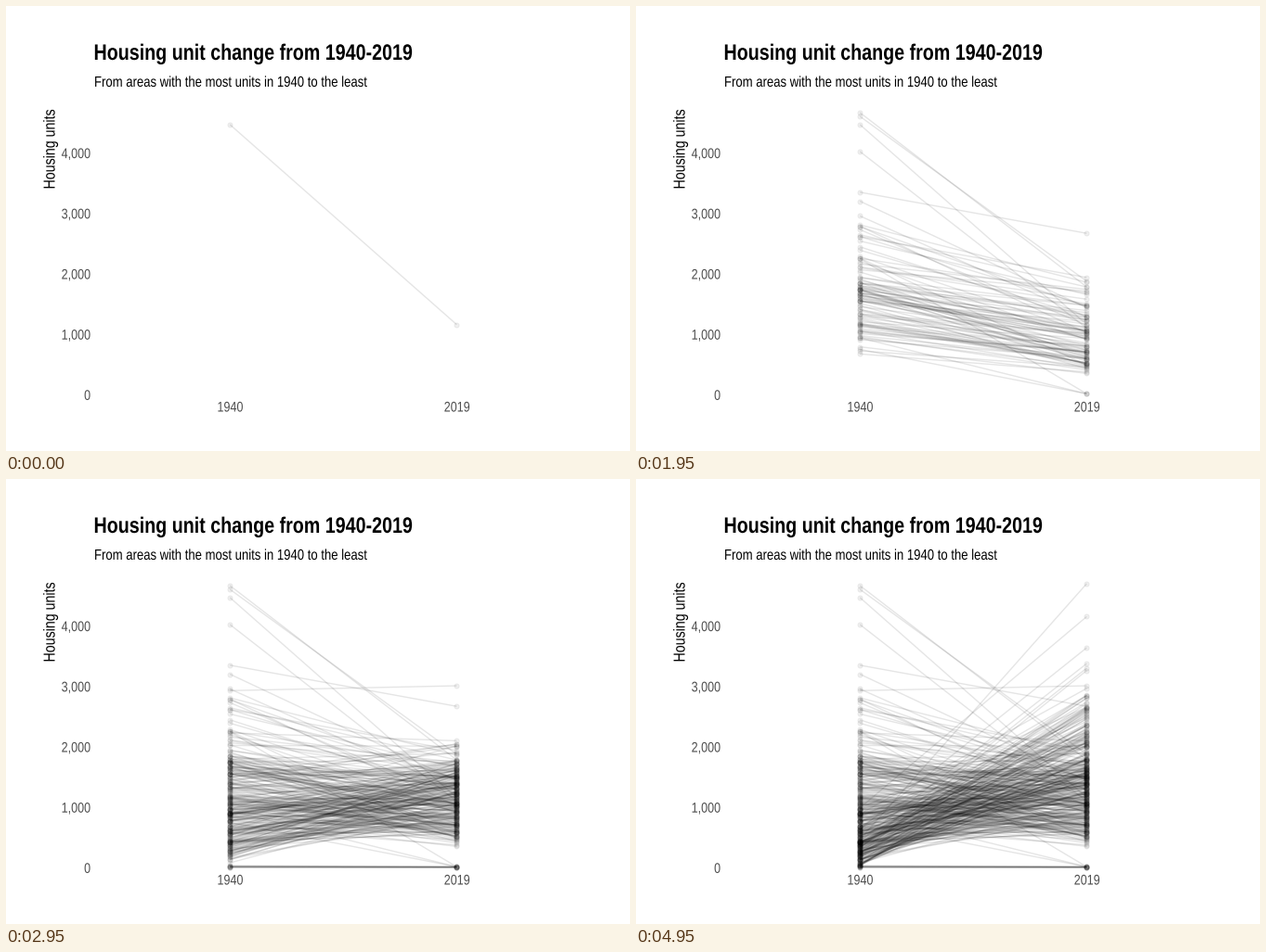
Write a matplotlib script that moves like this. It is 672 by 480 pixels and loops after 5000 ms.

```python
import matplotlib.pyplot as plt
import numpy as np
from matplotlib.animation import FuncAnimation
from matplotlib.collections import LineCollection
from matplotlib.patches import PathPatch
from matplotlib.textpath import TextPath
from matplotlib.transforms import Affine2D

W, H, DPI = 672, 480, 96
FRAMES, INTERVAL = 100, 50
X0, X1 = 241.2, 485.4          # columns of the two years
Y_ZERO, UNIT = 419.3, 0.0652   # pixel of zero, pixels per housing unit
PX = 72 / DPI                  # points per pixel
GREY = "#4d4d4d"
NARROW = 0.82                  # proportion of a narrow sans face

# Lines that stand apart from the crowd: (units in 1940, units in 2019)
LANDMARKS = [
    (4469, 1160), (4023, 1100), (4667, 1783), (4605, 1876), (2250, 15),
    (3202, 1439), (2788, 1024), (2259, 488), (940, 15), (750, 15),
    (3350, 2670), (2930, 3010), (640, 3640), (990, 4155), (470, 4700),
]
# The crowd: (lines, smallest change, largest change)
SPANS = [
    (2, -1700, -1570), (29, -1330, -725), (103, -725, 110), (75, 110, 645),
    (112, 645, 1860), (38, 1860, 2560), (3, 2930, 3060),
]
# Lowest and highest 1940 value possible for a given change
CHANGE = [-1650, -1330, -725, -300, 110, 645, 1000, 1860, 2560, 3060]
LOWEST = [2950, 1670, 1060, 650, 400, 130, 60, 30, 30, 240]
HIGHEST = [3060, 2980, 2750, 2400, 2150, 1750, 1500, 1150, 780, 450]

rng = np.random.default_rng(1940)


def spread(n, low, high):
    """Evenly stratified random values, so every short span holds some."""
    return low + (high - low) * (np.arange(n) + rng.random(n)) / n


def make_data():
    change = np.concatenate([spread(*span) for span in SPANS])
    low = np.interp(change, CHANGE, LOWEST)
    high = np.interp(change, CHANGE, HIGHEST)
    # Growing areas lean towards small beginnings
    lean = np.interp(change, [-700, 1000], [1.6, 3.2])
    start = low + (high - low) * rng.beta(1.2, lean)
    empty = rng.uniform(5, 35, 9)
    return np.vstack([
        LANDMARKS,
        np.column_stack([start, start + change]),
        np.column_stack([empty, empty * 0.6]),
    ])


data = make_data()
change = data[:, 1] - data[:, 0]
step = np.ptp(change) / (FRAMES - 1)
reveal = np.floor((change - change.min()) / step + 1e-6)
order = np.argsort(reveal, kind="stable")
reveal = reveal[order]
heights = Y_ZERO - UNIT * data[order]
segments = np.stack(
    [np.column_stack([np.full(len(heights), x), heights[:, i]])
     for i, x in enumerate((X0, X1))], axis=1)

fig = plt.figure(figsize=(W / DPI, H / DPI), dpi=DPI, facecolor="white")
ax = fig.add_axes([0, 0, 1, 1])
ax.set_xlim(0, W)
ax.set_ylim(H, 0)
ax.axis("off")


def label(x, y, text, size, color="black", weight="normal", align=0, angle=0):
    """Text with its baseline at y; align 0 is left, 0.5 centre, 1 right."""
    font = {"family": "Liberation Sans", "weight": weight}
    path = TextPath((0, 0), text, size=size, prop=font)
    shift = -align * path.get_extents().x1
    place = (Affine2D().translate(shift, 0).scale(NARROW, -1)
             .rotate_deg(-angle).translate(x, y))
    ax.add_patch(PathPatch(place.transform_path(path), fc=color, lw=0))


label(94.5, 58, "Housing unit change from 1940-2019", 24, weight="bold")
label(95, 87, "From areas with the most units in 1940 to the least", 16)
label(52.5, 197.5, "Housing units", 17.33, angle=90)
for value in range(0, 5000, 1000):
    label(90.6, Y_ZERO - UNIT * value + 5.6, f"{value:,}", 15.33, GREY, align=1)
for x, year in ((X0, "1940"), (X1, "2019")):
    label(x, 437.5, year, 15.33, GREY, align=0.5)

lines = LineCollection([], colors=[(0, 0, 0, 0.1)], linewidths=1.42 * PX)
ax.add_collection(lines, autolim=False)
dots = ax.scatter([], [], s=(5.2 * PX) ** 2, facecolors=[(0, 0, 0, 0.06)],
                  edgecolors=[(0, 0, 0, 0.06)], linewidths=0.945 * PX)


def draw(frame):
    shown = segments[:np.searchsorted(reveal, frame, side="right")]
    lines.set_segments(shown)
    dots.set_offsets(shown.reshape(-1, 2))
    return lines, dots


anim = FuncAnimation(fig, draw, frames=FRAMES, init_func=lambda: draw(0),
                     interval=INTERVAL, repeat=True, repeat_delay=0)
plt.show()
```
